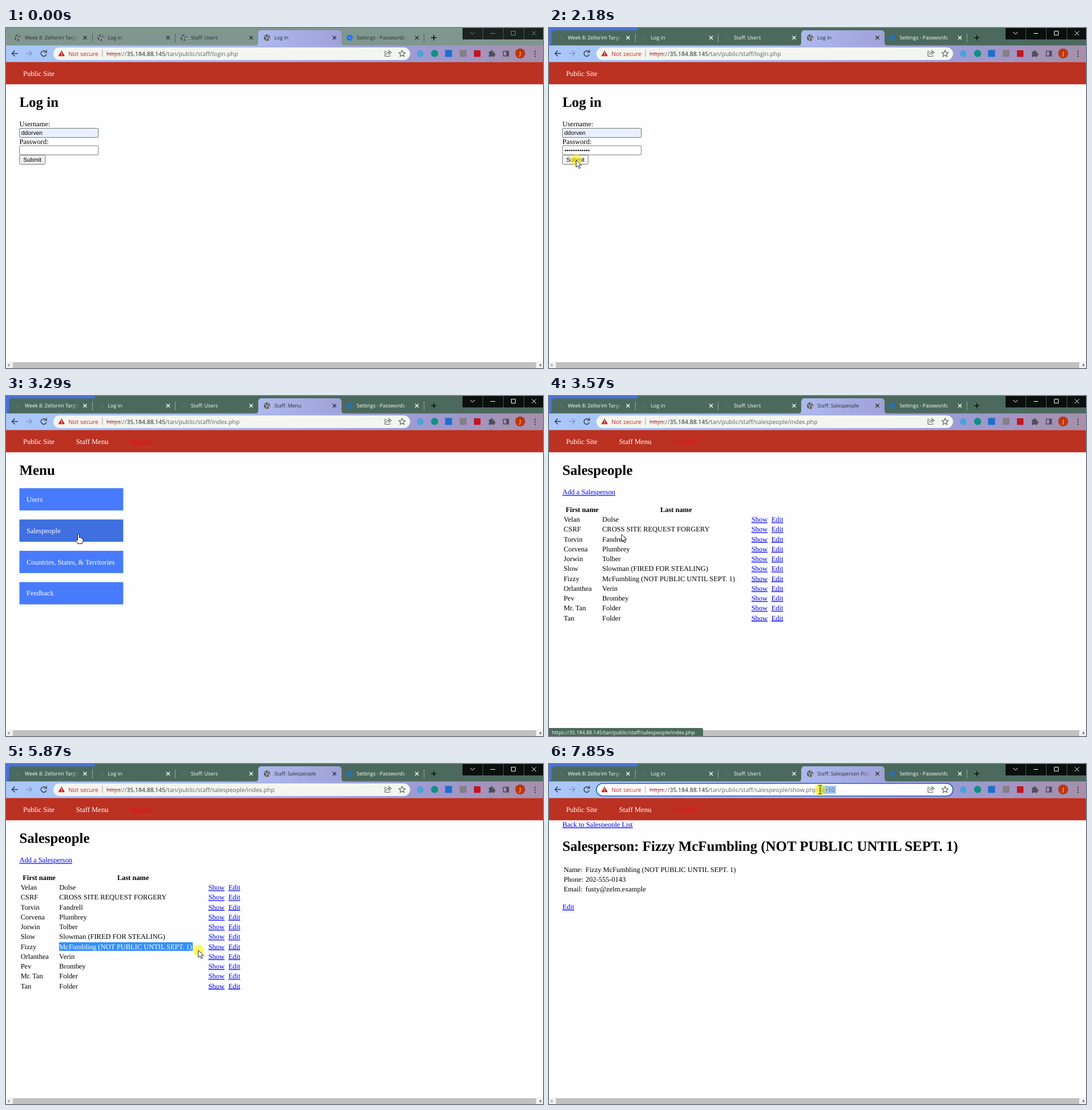
An HTML page that plays this animation: 941x595 px, repeating every 7990 ms.

```html
<!DOCTYPE html>
<html lang="en">
<head>
<meta charset="utf-8">
<title>Staff site walkthrough</title>
<style>
html, body { margin: 0; width: 100%; height: 100%; overflow: hidden; background: #fefefe; }
svg { display: block; width: 941px; height: 595px; text-rendering: geometricPrecision; }
text { white-space: pre; }
.page text { font: 12.44px "Liberation Serif", Times, serif; }
.page .h1 { font-size: 24.9px; font-weight: bold; }
.page .b { font-weight: bold; }
.page .form { font: 10.3px "Liberation Sans", Arial, sans-serif; }
.page .nav { font-size: 12.6px; fill: #fff; }
.page .out { font-size: 12.6px; fill: #f00; }
.page .link { fill: #00e; text-decoration: underline; }
.page .w { fill: #fff; }
.ui { font: 10.4px "Open Sans", "Noto Sans", sans-serif; fill: #5f6368; }
.tab { font: 8.9px "Open Sans", "Noto Sans", sans-serif; fill: #26302c; }
.status { font: 8.85px "Open Sans", "Noto Sans", sans-serif; fill: #fff; }
.strip { fill: #7f978f; }
.cross { stroke: #26302c; stroke-width: 1.3; }
.sep { stroke: #4d5f58; }
.win { fill: #1b2320; }
.winIcon { stroke: #7d8481; fill: none; }
.edge { fill: #4a70e0; display: none; }
.active .strip { fill: #4b6a5d; }
.active .edge { display: inline; }
.active .back .tab { fill: #fff; }
.active .back .cross { stroke: #fff; }
.active .back .globe { opacity: .12; }
.active .back .gear { opacity: .7; }
.active .sep { stroke: #92a59d; }
.active .win { fill: #0b100e; }
.active .winIcon { stroke: #fff; }
</style>
</head>
<body>
<svg id="stage" viewBox="0 0 941 595"></svg>
<script>
const LOOP = 7990;
const HOST = '35.184.88.145';
const ROOT = '/tan/public/staff/';
const stage = document.getElementById('stage');
const $ = id => document.getElementById(id);

const text = (x, y, s, cls = '', extra = '') =>
  `<text x="${x}" y="${y}" class="${cls}" ${extra}>${s}</text>`;
const rect = (x, y, w, h, fill, extra = '') =>
  `<rect x="${x}" y="${y}" width="${w}" height="${h}" fill="${fill}" ${extra}/>`;
const circle = (x, y, r, fill) => `<circle cx="${x}" cy="${y}" r="${r}" fill="${fill}"/>`;
const path = (d, stroke, width = 1.4, fill = 'none') =>
  `<path d="${d}" stroke="${stroke}" stroke-width="${width}" fill="${fill}"/>`;
const middle = 'text-anchor="middle"';

const globe = `<g class="globe">${circle(5.5, 17, 5.7, '#55595d')}
  <path d="M1 15l4 1 1 2-2 1v3M6 12l1 2 3 1M7 18l3 0-1 3" stroke="#b9c2c4" stroke-width="1.3" fill="none"/></g>`;
const gear = `<g class="gear"><circle cx="5.5" cy="17" r="4.6" fill="none" stroke="#1a73e8" stroke-width="2" stroke-dasharray="2 1.61"/>
  <circle cx="5.5" cy="17" r="3" fill="none" stroke="#1a73e8" stroke-width="2.4"/></g>`;

function tab(x, label, icon, back = true) {
  return `<g transform="translate(${x})" class="${back ? 'back' : ''}">${icon}
    <g mask="url(#fade)">${text(18, 20.3, label, 'tab', back ? '' : 'id="title"')}</g>
    <path class="cross" d="M120.5 14l6 6m0-6l-6 6"/></g>`;
}

const defs = `<defs>
  <linearGradient id="bar"><stop offset="0" stop-color="#a9c9fb"/><stop offset=".5" stop-color="#a9b3ea"/>
    <stop offset=".75" stop-color="#9d9cd4"/><stop offset="1" stop-color="#a68fab"/></linearGradient>
  <linearGradient id="front"><stop offset="0" stop-color="#afbaee"/><stop offset="1" stop-color="#9fa0d8"/></linearGradient>
  <linearGradient id="fadeFill" gradientUnits="userSpaceOnUse" x1="98" x2="112" y1="0" y2="0">
    <stop offset="0" stop-color="#fff"/><stop offset="1" stop-color="#000"/></linearGradient>
  <mask id="fade" maskUnits="userSpaceOnUse" x="0" y="0" width="120" height="32">${rect(0, 0, 120, 32, 'url(#fadeFill)')}</mask>
</defs>`;

const tabs = `<rect class="strip" width="941" height="31"/>
  <path class="edge" d="M0 0H155V3Q154 6 150 4H11Q5 4 5 10V24Q5 30 0 30Z"/>
  <path d="M436 31Q442 31 442 25V10Q442 4 448 4H582Q588 4 588 10V25Q588 31 594 31Z" fill="url(#front)"/>
  ${[151.5, 296.5, 732.5].map(x => `<path class="sep" d="M${x} 10v15"/>`).join('')}
  ${tab(15, 'Week 8: Zellorim Targe', globe)}${tab(160.5, 'Log in', globe)}
  ${tab(306, 'Staff: Users', globe)}${tab(452, 'Log in', globe, false)}
  ${tab(596.5, 'Settings - Passwords', gear)}
  ${path('M745 17h9.4M749.7 12.3v9.4', '#111', 1.5)}
  <rect class="win" x="800" width="141" height="20"/>
  ${path('M835.5 0v20M871.5 0v20M907.5 0v20', '#4e5653', 1)}
  <path class="winIcon" d="M813.5 7l4 4 4-4M849 9.5h8M885.5 5.5h7v7h-7zM921.5 5.5l7.5 7.5m0-7.5l-7.5 7.5"/>`;

const toolbar = `${rect(0, 30.5, 941, 29, 'url(#bar)')}
  ${path('M21 44.5H10.5M15.5 39.5l-5 5 5 5', '#3c4043', 1.5)}
  ${path('M35 44.5h10.5M40.5 39.5l5 5-5 5', '#8795b8', 1.5)}
  ${path('M69.5 41.2A4.8 4.8 0 1 0 70.8 46M71 38.5v4h-4', '#3c4043', 1.5)}
  <rect id="pill" x="83" y="34" width="625" height="22" rx="11" fill="#f3f6f0" stroke="#1c63c6" stroke-width="0"/>
  <path d="M97.3 39.3l5.8 10H91.5z" fill="#c5221f"/>${path('M97.3 42.5v3.4M97.3 47v1.2', '#fff', 1.2)}
  ${text(109.5, 48.5, 'Not secure', 'ui', 'style="fill:#c5221f"')}
  ${path('M169 38.5v12', '#9aa0a6', 1)}
  <rect id="urlMark" y="38" height="14" fill="#9dc6f0"/>
  <text x="176" y="48.5" class="ui"><tspan fill="#b5524c" text-decoration="line-through">https</tspan>://<tspan fill="#202124">${HOST}</tspan><tspan id="url"></tspan></text>
  ${path('M667 41h-3v8.5h8.5v-2M666.5 47q.5-4.500 5-4.500M669.500 39.500h0M671 39.700l4 3-4 3z', '#5f6368', 1.1)}
  <path d="M694 39.200l1.600 3.600 3.900.4-2.900 2.600.8 3.900-3.400-2-3.400 2 .8-3.900-2.900-2.600 3.900-.4z" fill="none" stroke="#5f6368" stroke-width="1.200"/>
  ${circle(726, 45, 6, '#4f9fd8')}${circle(751, 44.500, 6.200, '#0f8f83')}
  ${rect(769.500, 38.500, 12, 12, '#1a6fd0')}${rect(795, 38.500, 12, 12, '#857f85')}
  ${rect(820, 39, 11.500, 11.500, '#c3161c')}
  <path d="M846 41.500h3a1.800 1.800 0 1 1 3.400 0h3v3.200a1.800 1.800 0 1 1 0 3.400v2.400h-3a1.800 1.800 0 0 0-3.400 0h-3v-3.200a1.800 1.800 0 0 0 0-3.400z" fill="#4f4d58"/>
  ${path('M871.500 40.500h9v8.500h-9z', '#4f4d58', 1.500)}${rect(876.500, 40, 4.500, 9.500, '#4f4d58')}
  ${circle(901, 44.500, 8.700, '#bf360c')}${text(901, 48, 'J', 'ui', middle + ' style="fill:#fff;font-size:9.500px"')}
  ${[40.500, 45, 49.500].map(y => circle(927, y, 1.200, '#46434f')).join('')}`;

const field = (y, fill, id) =>
  rect(23.7, y, 138, 16, fill, `id="${id}" rx="1.5" stroke="#767676" stroke-width="1"`);
const dots = Array.from({ length: 12 }, (_, i) => circle(28.8 + i * 3.72, 214.2, 1.3, '#111')).join('');

const loginPage = `${text(23.5, 138, 'Log in', 'h1')}
  ${text(23.5, 172.4, 'Username:')}${field(175.5, '#e8f0fe', 'user')}${text(26.8, 187.4, 'ddorven', 'form')}
  ${text(23.5, 203, 'Password:')}${field(206, '#fff', 'secret')}<g id="dots">${dots}</g>
  <rect id="caret" y="208.5" width="1" height="11" fill="#000"/>
  ${rect(23.7, 222.5, 45, 16, '#efefef', 'id="submit" rx="2" stroke="#767676"')}
  ${text(46.2, 234.3, 'Submit', 'form', middle)}`;

const menuPage = text(23.5, 138, 'Menu', 'h1') +
  ['Users', 'Salespeople', 'Countries, States, &amp; Territories', 'Feedback'].map((s, i) =>
    rect(23.5, 161.3 + i * 54.8, 182, 39, '#487bfc', `id="item${i}"`) + text(36, 185 + i * 54.8, s, 'w')).join('');

const people = ['Velan,Dolse', 'CSRF,CROSS SITE REQUEST FORGERY', 'Torvin,Fandrell', 'Corvena,Plumbrey',
  'Jorwin,Tolber', 'Slow,Slowman (FIRED FOR STEALING)', 'Fizzy,McFumbling (NOT PUBLIC UNTIL SEPT. 1)',
  'Orlanthea,Verin', 'Pev,Brombey', 'Mr. Tan,Folder', 'Tan,Folder'];
const LAST = people[6].split(',')[1];
const ROW = 17.23;

const listPage = `${text(23.5, 138, 'Salespeople', 'h1')}${text(23.5, 172.4, 'Add a Salesperson', 'link')}
  ${text(58, 203, 'First name', 'b', middle)}${text(222.7, 203, 'Last name', 'b', middle)}
  ${people.map((p, i) => {
    const [first, last] = p.split(','), y = 220.2 + i * ROW;
    return text(25.7, y, first) + text(93.3, y, last) + text(354.7, y, 'Show', 'link') + text(389.7, y, 'Edit', 'link');
  }).join('')}
  <clipPath id="markClip"><rect id="mark" x="93" y="312" height="15"/></clipPath>
  <g clip-path="url(#markClip)">${rect(93, 312, 234.500, 15, '#338fff')}${text(93.300, 220.200 + 6 * ROW, LAST, 'w')}</g>`;

const showPage = `${text(23.5, 110, 'Back to Salespeople List', 'link')}
  ${text(23.5, 152, 'Salesperson: Fizzy ' + LAST, 'h1')}
  ${[['Name:', 'Fizzy ' + LAST], ['Phone:', '202-555-0143'], ['Email:', 'fusty@zelm.example']].map(([k, v], i) =>
    text(25.7, 189 + i * ROW, k) + text(64, 189 + i * ROW, v)).join('')}
  ${text(23.5, 254, 'Edit', 'link')}`;

const pages = [
  { from: 0, body: loginPage, title: 'Log in', url: 'login.php' },
  { from: 2400, body: menuPage, title: 'Staff: Menu', url: 'index.php' },
  { from: 3570, body: listPage, title: 'Staff: Salespeople', url: 'salespeople/index.php' },
  { from: 6570, body: showPage, title: 'Staff: Salesperson Fizz', url: 'salespeople/show.php?id=10' }
];

const scrollbar = `${rect(0, 584, 941, 11, '#f1f1f1')}${rect(12, 585, 917, 10, '#c1c1c1')}
  <path d="M6 587.5v5l-3-2.5z" fill="#8a8a8a"/><path d="M935.5 587.5v5l3-2.5z" fill="#505050"/>`;

const pointers = `<circle id="glow" r="9.800" fill="#fff200" opacity=".6"/>
  <path id="arrow" d="M0 0V12.500L3 9.800 5.200 14.800 7.400 13.800 5.200 9H9.200Z" fill="#fff" stroke="#111" stroke-width=".9"/>
  <path id="beam" d="M-3 -7.500h2.200l.8.700.8-.7H3M0 -7V7M-3 7.500h2.200L0 6.800l.8.700H3" fill="none" stroke="#222"/>
  <path id="hand" d="M-1.500 1Q-1.500 -.5 0 -.5T1.500 1V6Q3.500 5 4 6.500 6 6 6.300 7.500 8 7.500 8 9V12.500L6.500 16.500H-1L-4.800 10.500Q-4.500 8.500-1.500 10.500Z" fill="#fff" stroke="#111"/>`;

stage.innerHTML = `${defs}${rect(0, 0, 941, 595, '#fefefe')}${tabs}${toolbar}
  <g class="page">${rect(0, 59.500, 941, 39, '#bb3122')}${text(30, 84, 'Public Site', 'nav')}
    <g id="staffNav">${text(122.700, 84, 'Staff Menu', 'nav')}${text(216.500, 84, 'Log out', 'out')}</g>
    ${pages.map((p, i) => `<g id="page${i}">${p.body}</g>`).join('')}</g>
  ${scrollbar}
  <g id="status"><path id="statusBox" fill="#4b6a5d"/>${text(5, 592, '', 'status', 'id="statusText"')}</g>
  <g id="cursor">${pointers}</g>`;

// Each entry: time, x, y, pointer shape used until the next entry.
const track = [
  [0, 798, 557, ''], [70, 798, 557, 'arrow'], [700, 42, 214, 'beam'], [740, 40, 212.500, 'beam'],
  [1130, 40, 212.500, ''], [1660, 41, 217, 'beam'], [1760, 43, 223, 'arrow'], [1940, 47.500, 231, 'arrow'],
  [2330, 47.500, 231, 'arrow'], [2400, 50, 232, 'hand'], [3080, 127, 242, 'hand'],
  [3570, 127, 242, 'arrow'], [3900, 128, 262, 'arrow'], [4240, 419, 360, 'arrow'],
  [4590, 141.500, 326, 'arrow'], [4730, 131, 325, 'arrow'], [4860, 130, 325, 'beam'],
  [5080, 98, 326, 'beam'], [5150, 98, 326, 'beam'], [5600, 262, 326, 'beam'],
  [5780, 330, 326, 'arrow'], [5870, 337, 326, 'arrow'], [5940, 337, 326, 'arrow'],
  [6120, 357, 323, 'hand'], [6280, 362, 321, 'hand'], [6570, 362, 318, 'arrow'],
  [6640, 358.500, 308, 'arrow'], [7080, 490, 66, 'arrow'], [7140, 504, 50, 'beam'], [7240, 505, 45, 'beam'],
  [7450, 503, 45, 'beam'], [7780, 475, 45, 'beam'], [LOOP, 475, 45, 'beam']
];
const presses = [[870, 940], [2180, 2330], [3430, 3500], [5150, 5940], [6430, 6500], [7380, LOOP]];
const hints = [[3360, 3570, 'salespeople/index.php', 270], [6430, 6570, 'salespeople/show.php?id=10', 287]];

const within = (t, a, b) => t >= a && t < b;
const clamp = v => Math.min(1, Math.max(0, v));
const show = (id, on) => $(id).setAttribute('display', on ? 'inline' : 'none');
const set = (id, attrs) => { for (const k in attrs) $(id).setAttribute(k, attrs[k]); };

function pointerAt(t) {
  const i = Math.max(0, track.findIndex(k => k[0] > t) - 1);
  const [t0, x0, y0, shape] = track[i], [t1, x1, y1] = track[i + 1];
  const u = (t - t0) / (t1 - t0), long = t1 - t0 > 300;
  const e = long ? u * u * (3 - 2 * u) : u;
  return { x: x0 + (x1 - x0) * e, y: y0 + (y1 - y0) * e, shape };
}

function drawStatus(t) {
  const hint = hints.find(([a, b]) => within(t, a, b + 190));
  show('status', hint);
  if (!hint) return;
  const [, end, url, width] = hint;
  set('status', { opacity: 1 - clamp((t - end) / 160) });
  set('statusBox', { d: `M0 581H${width - 3}Q${width} 581 ${width} 584V595H0Z` });
  $('statusText').textContent = 'https://' + HOST + ROOT + url;
}

function render(t) {
  const p = pointerAt(t);
  const current = pages.findLastIndex(page => t >= page.from);
  stage.classList.toggle('active', t >= 870);
  pages.forEach((_, i) => show('page' + i, i === current));
  show('staffNav', current > 0);
  $('title').textContent = pages[current].title;
  $('url').textContent = ROOT + pages[current].url;

  const focused = within(t, 870, 2180);
  set('secret', { stroke: focused ? '#101010' : '#767676', 'stroke-width': focused ? 1.7 : 1 });
  show('dots', t >= 1590);
  show('caret', within(t, 870, 1390) || within(t, 1590, 2180));
  set('caret', { x: t < 1590 ? 27 : 70.5 });
  set('submit', { fill: t >= 2180 ? '#f5f5f5' : t >= 1800 ? '#e5e5e5' : '#efefef' });
  set('item1', { fill: current === 1 ? '#3f6fe0' : '#487bfc' });

  set('mark', { width: within(t, 5150, 6430) ? Math.min(234.5, Math.max(0, p.x - 93)) : 0 });
  const typing = t >= 7380, left = Math.max(476, p.x);
  set('pill', { 'stroke-width': typing ? 1.6 : 0, fill: typing ? '#fff' : '#f3f6f0' });
  set('urlMark', { x: left, width: typing ? Math.max(0, 503 - left) : 0 });

  drawStatus(t);
  set('cursor', { transform: `translate(${p.x.toFixed(2)} ${p.y.toFixed(2)})` });
  for (const shape of ['arrow', 'beam', 'hand']) show(shape, shape === p.shape);
  show('glow', presses.some(([a, b]) => within(t, a, b)));
}

let start;
function tick(now) {
  start ??= now;
  render((now - start) % LOOP);
  requestAnimationFrame(tick);
}
render(0);
requestAnimationFrame(tick);
</script>
</body>
</html>
```
